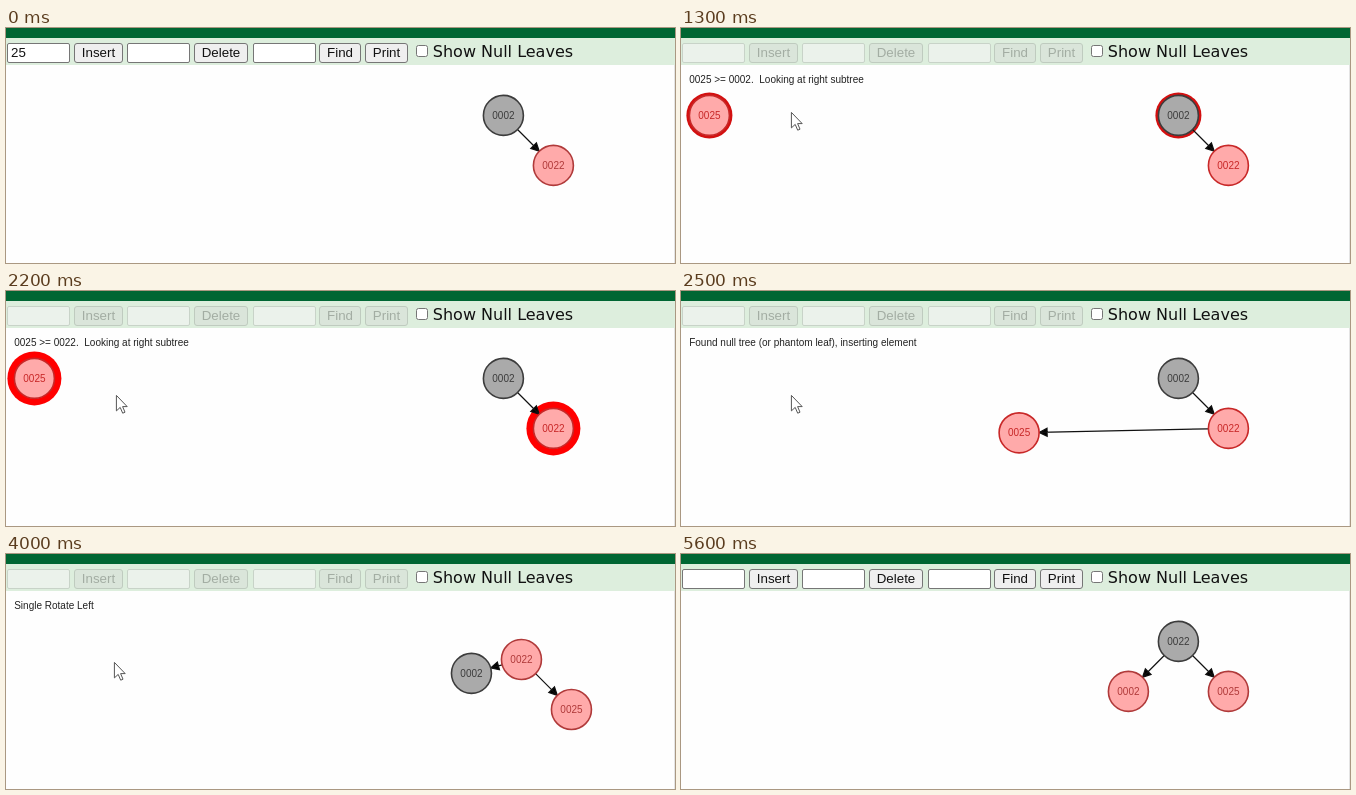
An HTML page that plays this animation: 669 px wide and 235 px high, repeating every 6500 ms.

```html
<!DOCTYPE html>
<html lang="en">
<head>
<meta charset="utf-8">
<title>Tree insertion</title>
<style>
  html, body { margin: 0; width: 100%; height: 100%; overflow: hidden; background: #fefefe; }
  #stage { position: relative; width: 669px; height: 235px; overflow: hidden;
    font: 13.333px/17px "Liberation Sans", Arial, sans-serif; }
  #head { position: absolute; width: 669px; height: 10px; background: #006633; }
  #bar { position: absolute; top: 10px; width: 669px; height: 27px; background: #ddeedd; }
  #edge { position: absolute; left: 668px; top: 37px; width: 1px; height: 198px; background: #e4e4e4; }
  .field, .button, .check { position: absolute; box-sizing: border-box; border: 1px solid #767676; }
  .field, .button { top: 5px; height: 20px; white-space: pre; color: #111; }
  .field { width: 63px; padding-left: 3px; background: #fff; border-radius: 2px; }
  .button { text-align: center; background: #efefef; border-radius: 3px; }
  .off .field { color: transparent; background: #ebf2eb; border-color: #c8d3c8; }
  .off .button { color: #a3ada3; background: #dae5da; border-color: #bfcbbf; }
  .check { left: 410px; top: 7px; width: 12px; height: 12px; background: #fff; border-radius: 2.5px; }
  .label { position: absolute; left: 426.8px; top: 4px; color: #111; white-space: pre;
    font: 16px/19px "DejaVu Sans", Verdana, sans-serif; }
  svg { position: absolute; left: 0; top: 0; }
  svg text { font: 10px "Liberation Sans", Arial, sans-serif; white-space: pre; }
</style>
</head>
<body>
<div id="stage">
  <div id="head"></div>
  <div id="bar">
    <div class="field" id="entry" style="left:1px"></div>
    <div class="button" style="left:68px;width:49px">Insert</div>
    <div class="field" style="left:121px"></div>
    <div class="button" style="left:188px;width:54px">Delete</div>
    <div class="field" style="left:247px"></div>
    <div class="button" style="left:313px;width:42px">Find</div>
    <div class="button" style="left:359px;width:43px">Print</div>
    <div class="check"></div>
    <div class="label">Show Null Leaves</div>
  </div>
  <div id="edge"></div>
  <svg id="view" width="669" height="235" viewBox="-0.4 -0.4 669 235"></svg>
</div>
<script>
const LOOP = 6500, TICK = 100, R = 20;
const view = document.getElementById('view');
const bar = document.getElementById('bar');
const entry = document.getElementById('entry');

function add(tag, attrs = {}, parent = view) {
  const el = document.createElementNS('http://www.w3.org/2000/svg', tag);
  set(el, attrs);
  return parent.appendChild(el);
}
function set(el, attrs) {
  for (const k in attrs) el.setAttribute(k, attrs[k]);
}
function show(el, on) {
  el.style.display = on ? '' : 'none';
}

// Tree slots
const ROOT = [497, 87], LEFT = [447, 137], RIGHT = [547, 137], LOW = [597, 187], START = [28, 87];

// Each path is a list of [time, x, y], linear in between
const paths = {
  a: [[3754, ...ROOT], [4139, ...LEFT]],
  b: [[3754, ...RIGHT], [4139, ...ROOT]],
  c: [[2285, ...START], [2680, ...LOW], [3754, ...LOW], [4139, ...RIGHT]],
  marker: [[1490, ...ROOT], [1890, ...RIGHT]],
  cursor: [[200, 112, 60], [400, 104, 24], [800, 104, 24], [1300, 110, 84], [1900, 110, 104],
    [2700, 110, 104], [3100, 108, 106], [3500, 108, 108], [4800, 108, 108], [5200, 78, 170], [5500, 102, 222]]
};

const messages = [
  [0], [800, 'Inserting 0025'],
  [1100, '0025 >= 0002.  Looking at right subtree'],
  [1900, '0025 >= 0022.  Looking at right subtree'],
  [2300, 'Found null tree (or phantom leaf), inserting element'],
  [3100, 'Node and parent are both red.  Node is right child, parent is right child',
    'Can fix extra redness with a single rotation'],
  [3500, 'Single Rotate Left'], [4200]
];

const within = (t, from, to) => t >= from && t < to;

function at(path, t) {
  if (t <= path[0][0]) return path[0].slice(1);
  for (let i = 1; i < path.length; i++) {
    const [t0, x0, y0] = path[i - 1], [t1, x1, y1] = path[i];
    if (t < t1) {
      const k = (t - t0) / (t1 - t0);
      return [x0 + (x1 - x0) * k, y0 + (y1 - y0) * k];
    }
  }
  return path[path.length - 1].slice(1);
}

// Highlight growth: triangle wave from 0 to 7
function pulse(t) {
  const p = (((t - 2200) / 394) % 1 + 1) % 1;
  return 7 * Math.abs(1 - 2 * p);
}

const lines = [0, 1].map(i => add('text', { x: 7.8, y: 55 + 12 * i, fill: '#222' }));
const rings = { a: add('circle'), b: add('circle'), c: add('circle') };
const glow = add('path', { stroke: '#f00', fill: 'none' });
const makeEdge = () => add('path', { stroke: '#111', 'stroke-width': 1.2, fill: '#000' });
const edges = { ab: makeEdge(), bc: makeEdge() };

function makeNode(label) {
  const g = add('g');
  const disc = add('circle', { r: R, 'stroke-width': 1.6 }, g);
  const text = add('text', { y: 3.3, 'text-anchor': 'middle' }, g);
  text.textContent = label;
  return { g, disc, text };
}
const nodes = { a: makeNode('0002'), b: makeNode('0022'), c: makeNode('0025') };
const marker = add('circle', { r: R, fill: 'none', stroke: '#007700', 'stroke-width': 1.3 });
const cursor = add('path', {
  d: 'M0 0V15.5L3.8 12L6.3 17.8L8.6 16.8L6.2 11.2H10.8Z', fill: '#fff', stroke: '#555', 'stroke-width': 1
});

function link(el, p, q) {
  const dx = q[0] - p[0], dy = q[1] - p[1], len = Math.hypot(dx, dy);
  const ux = dx / len, uy = dy / len;
  const x = q[0] - ux * R, y = q[1] - uy * R;
  const bx = x - ux * 8, by = y - uy * 8;
  const shaft = `M${p[0] + ux * R} ${p[1] + uy * R}L${x} ${y}`;
  set(el, { d: `${shaft}M${x} ${y}L${bx - uy * 4} ${by + ux * 4}L${bx + uy * 4} ${by - ux * 4}Z` });
  return shaft;
}

function draw(t) {
  const pos = {};
  for (const k in paths) pos[k] = at(paths[k], t);

  bar.className = within(t, 800, 4500) ? 'off' : '';
  entry.textContent = t < 800 ? '25' : '';
  const msg = messages.filter(m => m[0] <= t).pop();
  lines.forEach((el, i) => { el.textContent = msg[i + 1] || ''; });

  const size = pulse(t);
  const first = within(t, 1100, 1500), second = within(t, 1900, 2300);
  const lit = { a: first, b: second, c: first || second };
  const tone = Math.min(255, 178 + 11 * size);
  const dim = Math.max(0, 28 - 4 * size);
  const black = t >= 4200 ? 'b' : 'a';
  const red = within(t, 800, 2700) ? '#c82828' : '#b03a3a';

  for (const k in nodes) {
    const [x, y] = pos[k], { g, disc, text } = nodes[k];
    const ink = k === black ? '#3c3c3c' : red;
    set(g, { transform: `translate(${x} ${y})` });
    set(disc, { fill: k === black ? '#aaaaaa' : '#ffaaaa', stroke: ink });
    set(text, { fill: ink });
    set(rings[k], { cx: x, cy: y, r: R + size, fill: `rgb(${tone},${dim},${dim})` });
    show(rings[k], lit[k]);
  }
  show(nodes.c.g, t >= 800);

  // The rotation reverses the upper link
  const shaft = t >= 3754 ? link(edges.ab, pos.b, pos.a) : link(edges.ab, pos.a, pos.b);
  link(edges.bc, pos.b, pos.c);
  show(edges.bc, t >= 2300);
  set(glow, { d: shaft, 'stroke-width': size });
  show(glow, within(t, 3500, 3754));

  set(marker, { cx: pos.marker[0], cy: pos.marker[1] });
  show(marker, within(t, 1500, 1900));
  set(cursor, { transform: `translate(${pos.cursor[0]} ${pos.cursor[1]})` });
  show(cursor, within(t, 200, 5600));
}

const begin = performance.now();
function loop() {
  const t = (performance.now() - begin) % LOOP;
  draw(Math.floor(t / TICK) * TICK);
  requestAnimationFrame(loop);
}
loop();
</script>
</body>
</html>
```
